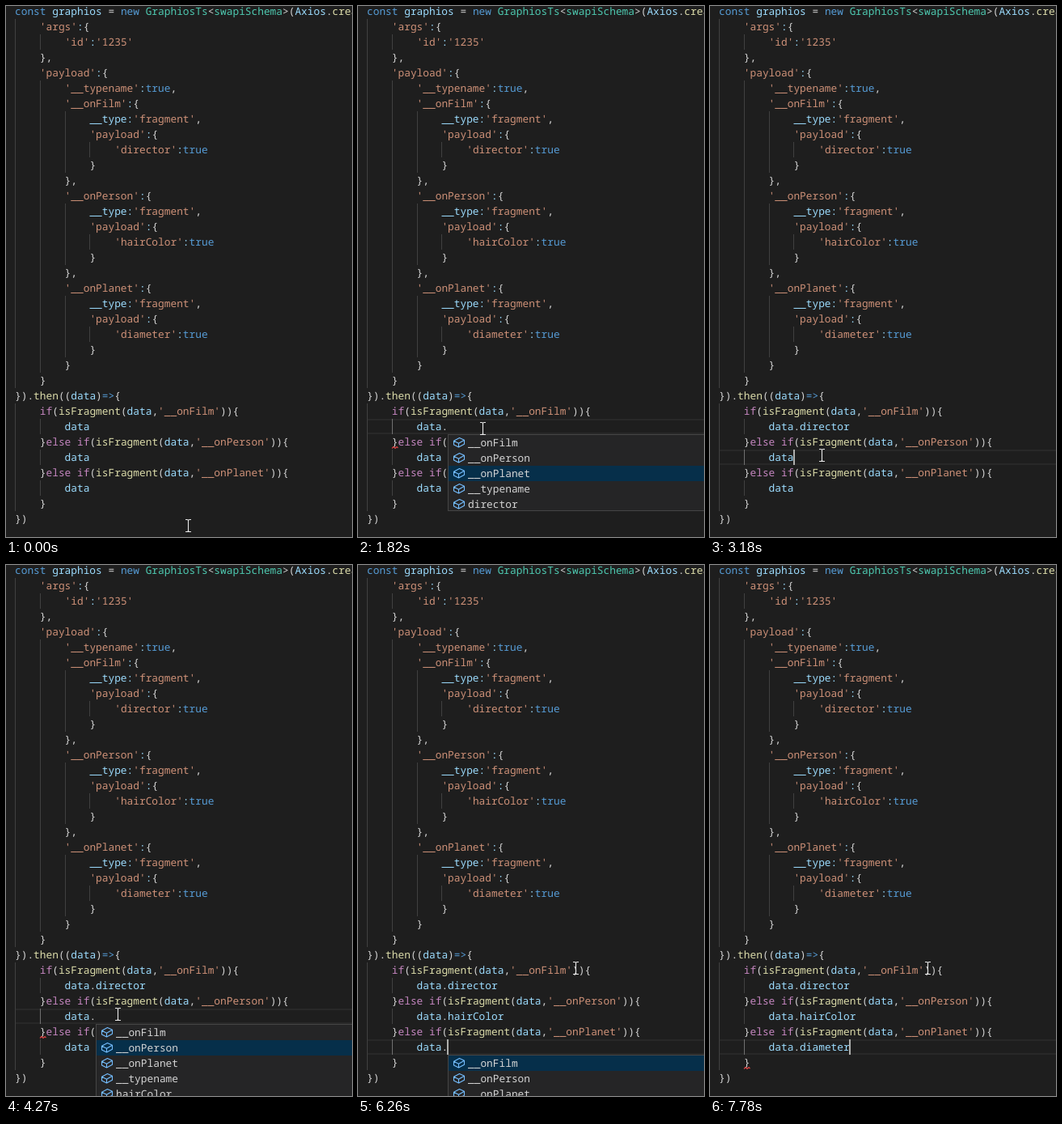
Animation, 428 px wide and 656 px high, one loop 8 s. Source, as an HTML page:

```html
<!DOCTYPE html>
<html lang="en">
<head>
<meta charset="utf-8">
<title>Typed fragments</title>
<style>
html, body { margin: 0; width: 100%; height: 100%; overflow: hidden; background: #1e1e1e; }
svg { display: block; width: 428px; height: 656px; }
text { font: 500 12.833px "Noto Sans Mono", "DejaVu Sans Mono", monospace; white-space: pre; text-rendering: geometricPrecision; }
</style>
</head>
<body>
<svg id="stage" viewBox="0 0 428 656"></svg>
<script>
const LOOP = 8000, LEFT = 11, CH = 7.7, ROW = 19;
const stage = document.getElementById('stage');
const colX = c => LEFT + c * CH;
const rowY = r => r * ROW - 3;

function add(parent, tag, attrs = {}, text) {
  const el = document.createElementNS('http://www.w3.org/2000/svg', tag);
  for (const k in attrs) el.setAttribute(k, attrs[k]);
  if (text !== undefined) el.textContent = text;
  return parent.appendChild(el);
}
const rect = (parent, x, y, width, height, fill) => add(parent, 'rect', { x, y, width, height, fill });
const show = (el, on) => el.setAttribute('visibility', on ? 'visible' : 'hidden');

const fragment = (type, field, end) => [
  `        '${type}':{`,
  `            __type:'fragment',`,
  `            'payload':{`,
  `                '${field}':true`,
  `            }`,
  `        }${end}`
];
const code = [
  `const graphios = new GraphiosTs<swapiSchema>(Axios.create({`,
  `    'args':{`,
  `        'id':'1235'`,
  `    },`,
  `    'payload':{`,
  `        '__typename':true,`,
  ...fragment('__onFilm', 'director', ','),
  ...fragment('__onPerson', 'hairColor', ','),
  ...fragment('__onPlanet', 'diameter', ''),
  `    }`,
  `}).then((data)=>{`,
  `    if(isFragment(data,'__onFilm')){`,
  `        data`,
  `    }else if(isFragment(data,'__onPerson')){`,
  `        data`,
  `    }else if(isFragment(data,'__onPlanet')){`,
  `        data`,
  `    }`,
  `})`
];

const rules = [
  [/^'/, '#ce9178'],
  [/^(const|new|true|=>)$/, '#569cd6'],
  [/^(if|else)$/, '#c586c0'],
  [/^(GraphiosTs|swapiSchema)$/, '#4ec9b0'],
  [/^(then|isFragment|create)$/, '#dcdcaa'],
  [/^(\w+|:)$/, '#9cdcfe']
];
const colorOf = token => (rules.find(([re]) => re.test(token)) || [0, '#d4d4d4'])[1];

function writeCode(el, source) {
  el.textContent = '';
  for (const token of source.match(/'[^']*'|\w+|=>|\s+|./g) || [])
    add(el, 'tspan', { fill: colorOf(token) }, token);
}

// One entry per branch: click, word marks, dot, list, error, choices, accept
const edits = [
  { row: 27, word: 'director', click: 600, mark: 890, dot: 1330, open: 1490, err: 1640, done: 2420,
    picks: [[1640, 1], [1820, 2], [1970, 3], [2120, 4]] },
  { row: 29, word: 'hairColor', click: 3030, mark: 3330, dot: 3630, open: 3800, err: 4100, done: 4870,
    picks: [[4270, 1], [4420, 3], [4570, 4]] },
  { row: 31, word: 'diameter', click: 5490, mark: 5790, dot: 6260, open: 6260, err: 6560, done: 7780,
    picks: [[6560, 1], [6720, 0], [7010, 4], [7330, 0], [7480, 4]] }
];
const mousePath = [
  [0, 225, 642], [150, 220, 628], [300, 188, 568], [450, 160, 528], [600, 154, 522],
  [2730, 150, 529], [2880, 141, 549], [3030, 138, 555],
  [5190, 146, 568], [5340, 162, 593], [5490, 165, 598], [5790, 214, 552], [5940, 269, 498]
];
const last = (list, t) => list.filter(k => k[0] <= t).pop();

// Current line
const lineBox = add(stage, 'g');
for (const y of [0, ROW - 2]) rect(lineBox, LEFT, y, 420, 2, '#282828');

// Occurrences of the variable
const marks = add(stage, 'g', { fill: '#575757', 'fill-opacity': .72 });
code.forEach((line, r) => {
  const c = line.indexOf('data');
  if (c >= 0) add(marks, 'rect', {
    x: colX(c), y: rowY(r), width: 4 * CH, height: ROW, ...(r === 25 && { fill: '#004972' })
  });
});

// Indent guides
const guide = (c, y, fill) => rect(stage, Math.round(colX(c)), y, 1, ROW, fill);
code.forEach((line, r) => {
  const indent = line.search(/\S/);
  for (let c = 0; c < indent; c += 4) guide(c, rowY(r), '#404040');
});
const activeGuide = guide(4, 0, '#707070');

const lines = code.map((line, r) => {
  const indent = line.search(/\S/);
  const el = add(stage, 'text', { x: colX(indent), y: rowY(r) + 14 });
  writeCode(el, line.trim());
  return el;
});

const squiggle = add(stage, 'path', { d: 'M42 17.5l2-2 2 2 2-2 1.5 1.5', fill: 'none', stroke: '#e64545', 'stroke-width': 1.1 });
const caret = rect(stage, 0, 0, 2, ROW, '#aeafad');

// Suggestion list
const list = add(stage, 'g');
rect(list, 111, 0, 430, 95, '#252526');
const picked = rect(list, 112, 0, 430, ROW, '#062f4a');
const items = ['__onFilm', '__onPerson', '__onPlanet', '__typename', ''].map((name, i) => {
  const y = 1 + i * ROW;
  add(list, 'path', {
    d: 'M-6.5-1.8L.5-5.5 6.5-2.8V2.2L-.5 6-6.5 3ZM-6.5-1.8L-.5 1.2 6.5-2.8M-.5 1.2V6',
    transform: `translate(125 ${y + 9})`, fill: 'none', stroke: '#75beff', 'stroke-width': 1.1, 'stroke-linejoin': 'round'
  });
  return add(list, 'text', { x: 136, y: y + 14, fill: '#d4d4d4' }, name);
});
add(list, 'rect', { x: 111.5, y: .5, width: 430, height: 94, fill: 'none', stroke: '#454545' });
list.setAttribute('clip-path', 'url(#listClip)');
rect(add(stage, 'clipPath', { id: 'listClip' }), 111, 0, 430, 95);

const mouse = add(stage, 'path', {
  d: 'M-3.5-7.5H-1.5Q0-7.5 0-6Q0-7.5 1.5-7.5H3.5M0-6V6M-3.5 7.5H-1.5Q0 7.5 0 6Q0 7.5 1.5 7.5H3.5',
  fill: 'none', stroke: '#e8e8e8', 'stroke-width': 1.1
});

const typed = edits.map(() => 'data');

function draw(t) {
  edits.forEach((e, i) => {
    const text = 'data' + (t >= e.done ? '.' + e.word : t >= e.dot ? '.' : '');
    if (text !== typed[i]) writeCode(lines[e.row], typed[i] = text);
  });

  const i = edits.filter(e => e.click <= t).length - 1;
  const e = edits[i];
  for (const el of [lineBox, activeGuide]) show(el, e);
  show(marks, e && t >= e.mark && t < e.dot);
  show(squiggle, e && t >= e.err && t < e.done + 310);
  const listOpen = e && t >= e.open && t < e.done;
  list.setAttribute('display', listOpen ? 'inline' : 'none');

  if (e) {
    const y = rowY(e.row);
    lineBox.setAttribute('transform', `translate(0 ${y})`);
    activeGuide.setAttribute('y', y);
    squiggle.setAttribute('transform', `translate(0 ${y + ROW})`);
    caret.setAttribute('x', Math.floor(colX(8 + typed[i].length) - .4));
    caret.setAttribute('y', y);
    const touched = [e.click, e.dot, e.done].filter(k => k <= t).pop();
    show(caret, (t - touched) % 1000 < 490);
    list.setAttribute('transform', `translate(0 ${y + ROW})`);
    items[4].textContent = e.word;
    picked.setAttribute('y', 1 + ROW * (last(e.picks, t) || [0, 0])[1]);
  } else show(caret, false);

  const [, x, y] = last(mousePath, t);
  mouse.setAttribute('transform', `translate(${x + .5} ${y})`);
}

const start = performance.now();
function tick() {
  draw((performance.now() - start) % LOOP);
  requestAnimationFrame(tick);
}
tick();
</script>
</body>
</html>
```
